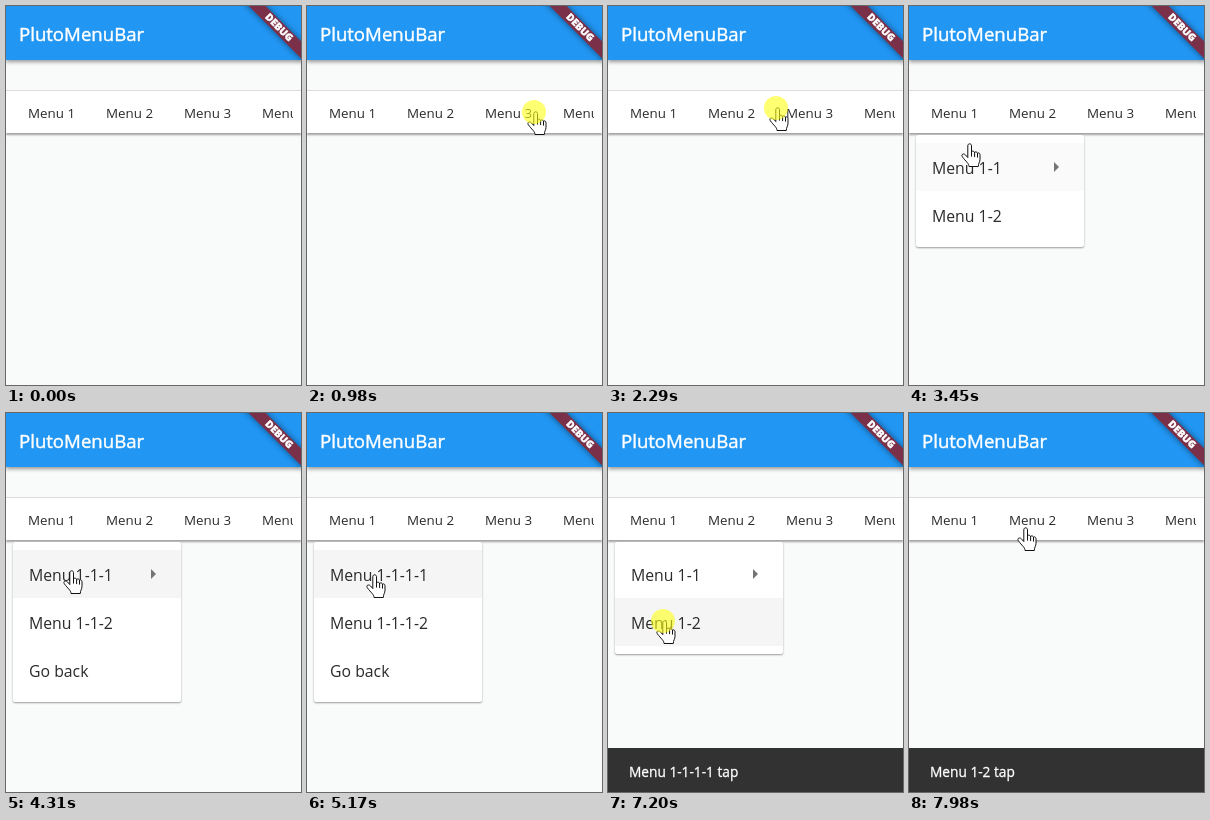
Animation of 295x379 px, one loop 8000 ms. Source, as an HTML page:

```html
<!DOCTYPE html>
<html lang="en">
<head>
<meta charset="utf-8">
<title>PlutoMenuBar</title>
<style>
  html, body { margin: 0; width: 100%; height: 100%; overflow: hidden; }
  body { position: relative; background: #f9fafa; color: #2b2b2b; font-family: "Open Sans", "Noto Sans", sans-serif; white-space: nowrap; }
  body *, svg { position: absolute; }
  svg * { position: static; }
  #appbar { left: 0; right: 0; top: 0; height: 54px; background: #2196f3; box-shadow: 0 2px 4px rgba(0,0,0,.4); }
  #title { left: 13px; font-size: 18.6px; line-height: 56px; color: #fff; -webkit-text-stroke: .45px #fff; }
  #bar { left: 0; right: 0; top: 84px; height: 42px; background: #fff; border-top: 1px solid #dcdcdc; box-shadow: 0 2px 2px rgba(0,0,0,.36); }
  #viewport { left: 7px; top: 0; width: 280px; height: 42px; overflow: hidden; }
  #menus span { font-size: 13.35px; line-height: 44px; }
  .popup { left: 7px; top: 129px; overflow: hidden; background: #fff; border-radius: 2px; box-shadow: 0 1px 2px rgba(0,0,0,.38); }
  .item { left: 0; width: 168px; height: 48px; }
  .item span { left: 16px; font-size: 15.8px; line-height: 50px; }
  .item i { left: 138px; top: 19px; border: solid transparent; border-width: 5px 0 5px 5px; border-left-color: #757575; }
  #snack { left: 0; right: 0; bottom: 0; overflow: hidden; background: #323232; }
  #snack span { left: 21px; font-size: 13.7px; line-height: 47px; color: #fff; -webkit-text-stroke: .3px #fff; }
  #overlay { left: 0; top: 0; width: 295px; height: 379px; }
  #press { width: 24px; height: 24px; border-radius: 50%; background: rgba(255,255,20,.6); }
</style>
</head>
<body>
<div id="appbar"><span id="title">PlutoMenuBar</span></div>
<div id="bar"><div id="viewport"><div id="menus"></div></div></div>
<div id="popups"></div>
<div id="snack"><span></span></div>
<svg id="overlay" viewBox="0 0 295 379">
  <g transform="translate(295 0) rotate(45)">
    <rect x="-50" y="25" width="100" height="12" fill="#7b3049" style="filter:drop-shadow(0 0 3px rgba(0,0,0,.5))"/>
    <text x="-.3" y="34" text-anchor="middle" font-size="10" font-weight="800" fill="#fff" stroke="#fff" stroke-width=".4">DEBUG</text>
  </g>
  <g id="cursor" fill="#fff" stroke="#111" stroke-linejoin="round" stroke-linecap="round">
    <g id="hand" transform="translate(-.7 -.8)">
      <path d="M.5 14V2.5C.5 0 4.2 0 4.2 2.5V9C4.2 7.5 7.3 7.7 7.3 9.5C7.5 8.2 10.2 8.5 10.2 10.3C10.5 9.2 12.7 9.5 12.7 11.5V16C12.7 19 11 20 11 23.3H1.7C1.7 20 -1.5 18.5 -5 13.5C-6.5 11-3.5 9.8-2 11.5Z"/>
      <path d="M4.2 9V13M7.3 9.5V13.5M10.2 10.3V14" fill="none"/>
    </g>
    <path id="arrow" d="M0 0V16L3.7 12.5 6.2 18.3 8.6 17.2 6.2 11.6H11.3Z"/>
  </g>
</svg>
<div id="press"></div>

<script>
const LOOP = 8000, MAX_SCROLL = 110;
const $ = id => document.getElementById(id);
const clamp = (v, lo = 0, hi = 1) => Math.min(hi, Math.max(lo, v));
const progress = (t, start, end) => clamp((t - start) / (end - start));
const smooth = p => p * p * (3 - 2 * p);
const easeOut = p => 1 - (1 - p) ** 3;

// Pointer stops: time, x, y
const path = [
  [210, 242, 340], [980, 227, 106], [1590, 10, 105], [1750, 10, 103],
  [2290, 168, 102], [2530, 71, 101], [2680, 27, 101], [3000, 27, 101],
  [3450, 59, 138], [3690, 64, 158], [4600, 64, 158], [5170, 66, 162],
  [5600, 66, 162], [6180, 48, 106], [6430, 48, 106], [7030, 55, 208],
  [7400, 55, 208], [7980, 115, 115], [LOOP, 115, 115]
];
const presses = [
  [975, 1600], [1745, 2350], [2905, 3055], [3835, 3985],
  [4465, 4615], [5395, 5545], [6255, 6405], [7195, 7345]
];
const popups = [
  { open: 3000, close: 3920, items: ["Menu 1-1 >", "Menu 1-2"] },
  { open: 3920, close: 4550, items: ["Menu 1-1-1 >", "Menu 1-1-2", "Go back"] },
  { open: 4550, close: 5480, items: ["Menu 1-1-1-1", "Menu 1-1-1-2", "Go back"] },
  { open: 6400, close: 7280, items: ["Menu 1-1 >", "Menu 1-2"] }
];
const snacks = [
  { open: 5500, close: 7290, text: "Menu 1-1-1-1 tap" },
  { open: 7540, close: Infinity, text: "Menu 1-2 tap" }
];

function add(parent, tag, text = "", className = "") {
  const el = document.createElement(tag);
  el.textContent = text;
  el.className = className;
  return parent.appendChild(el);
}

for (let i = 0; i < 5; i++)
  add($("menus"), "span", `Menu ${i + 1}`).style.left = 15 + 78 * i + "px";

for (const popup of popups) {
  popup.el = add($("popups"), "div", "", "popup");
  popup.rows = popup.items.map((label, i) => {
    const row = add(popup.el, "div", "", "item");
    row.style.top = 8 + 48 * i + "px";
    const text = add(row, "span", label.replace(" >", ""));
    if (label.endsWith(">")) add(row, "i");
    return { row, text };
  });
}

function pointerAt(t) {
  const next = path.findIndex(stop => stop[0] > t);
  if (next < 1) return path[0].slice(1);
  const [t0, x0, y0] = path[next - 1], [t1, x1, y1] = path[next];
  const p = progress(t, t0, t1), e = next === 1 ? easeOut(p) : smooth(p);
  return [x0 + (x1 - x0) * e, y0 + (y1 - y0) * e];
}

const isOpen = (popup, t) => t >= popup.open && t < popup.close;

function rowAt(t) {
  const [x, y] = pointerAt(t);
  return x > 7 && x < 175 ? Math.floor((y - 137) / 48) : -1;
}

function scrollAt(t, x) {
  if (t > 2290) return 0;
  return clamp(t < 1700 ? 227 - x : MAX_SCROLL + 10 - x, 0, MAX_SCROLL);
}

function drawPopup(popup, t) {
  const { el, rows, open, close } = popup;
  const p = t < close ? progress(t, open, open + 300) : 1 - progress(t, close + 100, close + 300);
  const n = rows.length, unit = 1 / (n + 1.5);
  el.style.display = p > 0 ? "" : "none";
  el.style.opacity = clamp(p * 3);
  el.style.width = 168 * clamp(p / unit) + "px";
  el.style.height = (16 + 48 * n) * clamp(p / (unit * n)) + "px";
  rows.forEach(({ row, text }, i) => {
    const hover = isOpen(popup, t) ? ((rowAt(t) === i) + (rowAt(t - 60) === i)) / 2 : 0;
    row.style.background = `rgba(0,0,0,${0.04 * hover})`;
    text.style.opacity = progress(p, (i + 1) * unit, (i + 2.5) * unit);
  });
}

function drawSnack(t) {
  const snack = snacks.findLast(s => t >= s.open);
  const p = !snack ? 0 : t < snack.close
    ? progress(t, snack.open, snack.open + 250)
    : 1 - progress(t, snack.close, snack.close + 250);
  $("snack").style.height = 44 * easeOut(p) + "px";
  const label = $("snack").firstChild;
  label.textContent = snack ? snack.text : "";
  label.style.opacity = progress(p, 0.45, 1);
}

function drawPointer(t, x, y) {
  const row = rowAt(t);
  const clickable = (y > 84 && y < 128) ||
    popups.some(popup => isOpen(popup, t) && row >= 0 && row < popup.items.length);
  $("cursor").style.display = t < 210 ? "none" : "";
  $("cursor").setAttribute("transform", `translate(${x} ${y})`);
  $("hand").style.display = clickable ? "" : "none";
  $("arrow").style.display = clickable ? "none" : "";
  $("press").style.display = presses.some(([from, to]) => t >= from && t < to) ? "" : "none";
  $("press").style.left = x - 12 + "px";
  $("press").style.top = y - 12 + "px";
}

function render(now) {
  const t = now % LOOP, [x, y] = pointerAt(t);
  $("menus").style.left = -scrollAt(t, x) + "px";
  popups.forEach(popup => drawPopup(popup, t));
  drawSnack(t);
  drawPointer(t, x, y);
}

let start;
function tick(now) {
  start ??= now;
  render(now - start);
  requestAnimationFrame(tick);
}
render(0);
requestAnimationFrame(tick);
</script>
</body>
</html>
```
